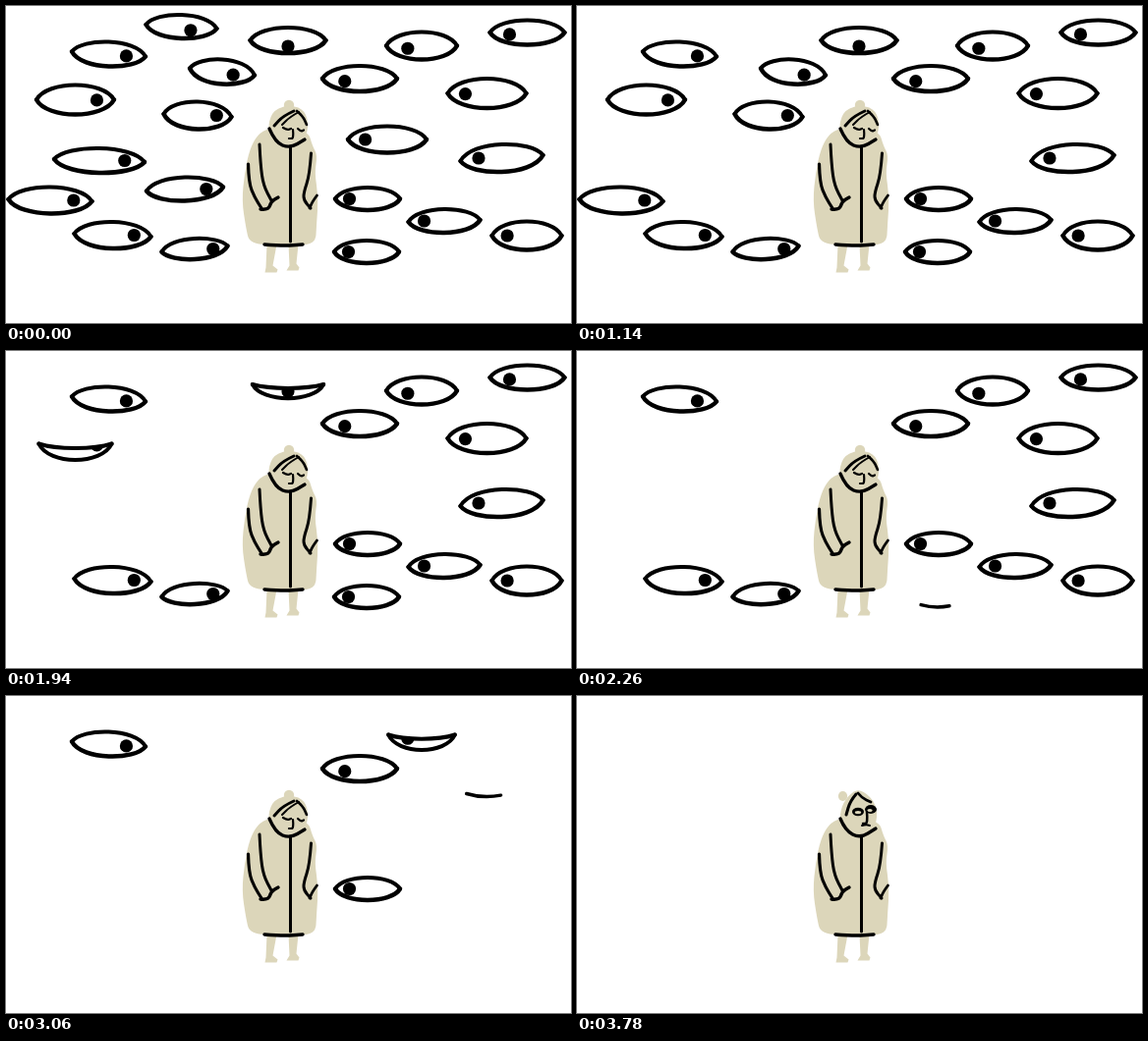
These frames come from a looping animation (575 by 323 pixels, 4.78 s). An HTML page with a canvas:

```html
<!DOCTYPE html>
<html lang="en">
<head>
<meta charset="utf-8">
<title>Closing eyes</title>
<style>
html, body { margin: 0; width: 100%; height: 100%; overflow: hidden; background: #fff; }
canvas { display: block; }
</style>
</head>
<body>
<canvas id="stage" width="575" height="323"></canvas>
<script>
const ctx = document.getElementById('stage').getContext('2d');
const LOOP = 4780, FIRST = 500, STEP = 80, LOOK_UP = 3460;
const INK = '#000', CLOTH = '#dcd6ba';
const OPEN = 0.14, SHUT = 0.25; // how far the curve handles sit from the corners
const PUPIL = 6.6;
const eyes = [];

// beat of the blink, centre, size, rise or fall of the right corner, stages until gone
function eye(beat, x, y, w, h, tilt = 0, stages = 3) {
  // every pupil turns to the woman, whose face is at the top of her body
  const dx = 288 - x, dy = Math.max(0, 110 - y);
  const d = Math.hypot(dx, dy);
  const px = x + 0.28 * w * (dx / d) ** 3, py = y + 6 * dy / d;
  eyes.push({ beat, x, y, w, h, tilt, stages, px, py });
}
eye(0, 95, 157.5, 92, 25, 3);
eye(1, 388, 136, 80, 27);
eye(4, 178.5, 21, 72, 24, 4, 2);
eye(5, 182, 186.5, 78, 24, -4);
eye(10, 220, 67, 66, 25, 7);
eye(13, 195, 111.5, 69, 28, 3);
eye(13, 45, 198, 85, 27, 2);
eye(18, 70.5, 95.5, 79, 30);
eye(18, 287, 35, 77, 26);
eye(20, 367, 250.5, 66, 23);
eye(23, 446, 219, 73, 24, -2);
eye(23, 108.5, 233.5, 78, 27, 3);
eye(25, 530.5, 27, 76, 25);
eye(27, 192, 247.5, 67, 21, -6);
eye(27, 504.5, 155, 84, 28, -6);
eye(29, 530, 234, 71, 29);
eye(30, 489.5, 89, 80, 30);
eye(32, 423, 40.5, 72, 28);
eye(35, 360, 74, 76, 26);
eye(35, 368, 196.5, 66, 23);
eye(39, 104.5, 49, 75, 25, 5, 2);

// side -1 is the upper lid, 1 the lower; bulge is its depth in half heights
function lid(e, bulge, full, back) {
  const l = e.x - e.w / 2, r = e.x + e.w / 2;
  const ly = e.y - e.tilt / 2, ry = e.y + e.tilt / 2;
  const cy = e.y + bulge * e.h * 2 / 3;
  const a = l + e.w * full, b = r - e.w * full;
  if (back) ctx.bezierCurveTo(b, cy, a, cy, l, ly);
  else {
    ctx.moveTo(l, ly);
    ctx.bezierCurveTo(a, cy, b, cy, r, ry);
  }
}

function strokeLid(e, bulge, full, width) {
  ctx.beginPath();
  lid(e, bulge, full);
  ctx.lineWidth = width;
  ctx.stroke();
}

function pupil(e) {
  ctx.beginPath();
  ctx.arc(e.px, e.py, PUPIL, 0, Math.PI * 2);
  ctx.fill();
}

function drawEye(e, t) {
  const stage = Math.floor((t - FIRST) / STEP + 1e-6) - e.beat;
  if (stage >= e.stages) return;
  ctx.fillStyle = ctx.strokeStyle = INK;
  if (stage < 0) {
    strokeLid(e, -1, OPEN, 4);
    strokeLid(e, 1, OPEN, 4.5);
    pupil(e);
  } else if (stage === 0) {
    const half = { ...e, w: e.w * 0.94, y: e.y - 1 };
    ctx.save();
    ctx.beginPath();
    lid(half, 0.3, SHUT);
    lid(half, 1.1, OPEN, true);
    ctx.clip();
    pupil(e);
    ctx.restore();
    strokeLid(half, 0.3, SHUT, 4);
    strokeLid(half, 1.1, OPEN, 4);
  } else if (stage === 1) {
    strokeLid(e, 1, SHUT, 4.2);
  } else {
    const len = e.w * 1.1;
    ctx.setLineDash([len * 0.4, len * 2]);
    ctx.lineDashOffset = -len * 0.25;
    strokeLid(e, 0.9, SHUT, 3.5);
    ctx.setLineDash([]);
  }
}

// smooth path through the middles between the given points
function curve(p, closed) {
  const n = p.length;
  const mid = (a, b) => [(a[0] + b[0]) / 2, (a[1] + b[1]) / 2];
  ctx.beginPath();
  ctx.moveTo(...(closed ? mid(p[n - 1], p[0]) : p[0]));
  for (let i = closed ? 0 : 1; i < (closed ? n : n - 1); i++) {
    ctx.quadraticCurveTo(...p[i], ...mid(p[i], p[(i + 1) % n]));
  }
  if (!closed) ctx.lineTo(...p[n - 1]);
}

function fill(...p) {
  curve(p, true);
  ctx.fillStyle = CLOTH;
  ctx.fill();
}

function line(width, ...p) {
  curve(p);
  ctx.lineWidth = width;
  ctx.strokeStyle = INK;
  ctx.stroke();
}

function oval(x, y, rx, ry, color) {
  ctx.beginPath();
  ctx.ellipse(x, y, rx, ry, 0, 0, Math.PI * 2);
  ctx.fillStyle = color;
  ctx.fill();
}

function leg(x, lean, sole) {
  ctx.beginPath();
  ctx.moveTo(x, 243);
  ctx.lineTo(x + 10, 243);
  ctx.lineTo(x + 8 - lean, sole - 7);
  ctx.lineTo(x + 11, sole - 3);
  ctx.lineTo(x + 10, sole);
  ctx.lineTo(x - 2, sole);
  ctx.lineTo(x + 1 - lean, sole - 5);
  ctx.fillStyle = CLOTH;
  ctx.fill();
}

function drawBody() {
  leg(265.5, 2, 271.5);
  leg(287.5, 0, 269.5);
  fill([268, 124], [256, 131], [248, 146], [243, 169], [240, 198], [244, 225], [248, 243],
    [282, 243], [315, 244], [316, 222], [318, 195], [314, 170], [317, 152], [312, 143], [307, 126]);
  line(3, [289.5, 143], [289.5, 190], [289.5, 240]);
  line(3.4, [263, 243], [282, 244.5], [302, 243]);
  line(3, [258, 141], [259, 162], [262, 183], [270.5, 199]);
  line(3.2, [246.5, 161], [247, 180], [253, 195], [260, 206]);
  line(3.4, [259, 207], [267, 208], [270, 199], [277, 195]);
  line(3, [310.5, 150], [309, 172], [303, 190], [303, 198], [310, 206]);
  line(2.8, [316.5, 193], [312, 199], [309, 206]);
}

function drawHeadDown() {
  oval(288, 101, 5.2, 5.2, CLOTH);
  fill([285, 101], [270, 108], [266, 128], [275, 140], [290, 144], [305, 136], [308, 118], [302, 104]);
  line(3.3, [268, 125], [274, 139], [289, 145], [304, 136]);
  line(3, [293, 107], [282, 112], [273, 122]);
  line(2, [298, 108], [289, 113], [281, 121]);
  line(2.6, [296, 107], [302, 112], [306, 121]);
  line(2.2, [282, 124], [286, 126.5], [290, 125]);
  line(2.2, [297, 125], [300, 128], [303, 126.5]);
  line(2.2, [292, 126], [293, 135], [288, 135]);
}

function drawHeadUp() {
  oval(270.5, 102, 4.6, 5, CLOTH);
  fill([279, 98], [269, 112], [267, 130], [276, 140], [290, 144], [304, 136], [306, 111], [290, 95]);
  line(3.3, [268, 125], [273, 137], [288, 145], [304, 135]);
  line(3, [284, 100], [278, 107], [274, 121]);
  line(2.8, [286, 99], [290, 104], [299, 108]);
  oval(286, 118, 6, 4.2, INK);
  oval(286, 118.5, 3.2, 1.5, CLOTH);
  oval(299, 115.5, 6, 4.4, INK);
  oval(298, 116.5, 2.7, 1.5, CLOTH);
  line(2.5, [295, 118], [296, 130], [291, 130]);
  line(2, [290, 132], [294, 131], [298, 132]);
}

function draw(t) {
  ctx.fillStyle = '#fff';
  ctx.fillRect(0, 0, 575, 323);
  ctx.lineCap = ctx.lineJoin = 'round';
  drawBody();
  (t < LOOK_UP ? drawHeadDown : drawHeadUp)();
  eyes.forEach(e => drawEye(e, t));
}

function tick() {
  draw(performance.now() % LOOP);
  requestAnimationFrame(tick);
}
tick();
</script>
</body>
</html>
```
